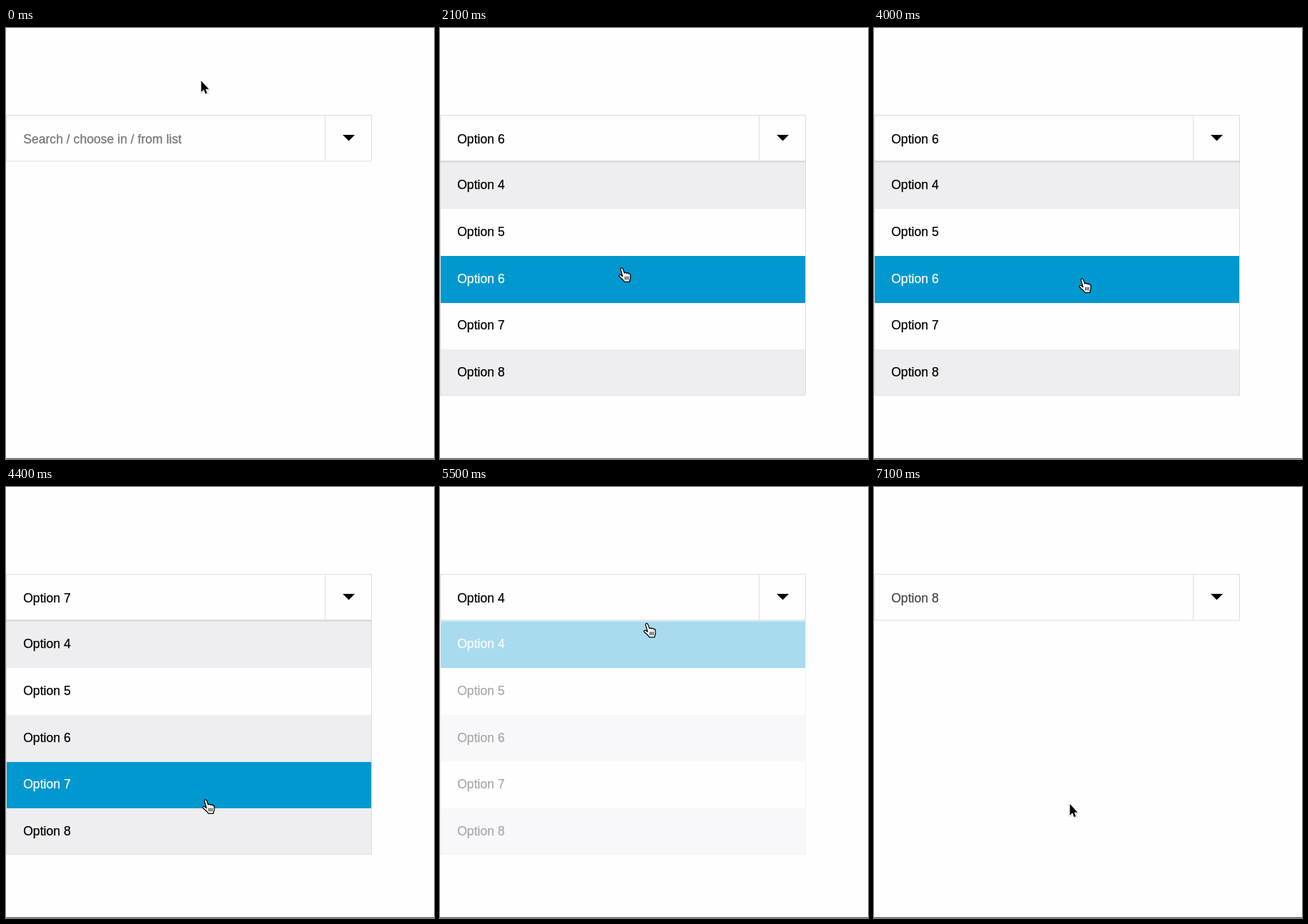
An HTML page for the animation above (8000 ms loop, 600 px wide and 605 px high).

```html
<!DOCTYPE html>
<html lang="en">
<head>
<meta charset="utf-8">
<title>Combo box</title>
<style>
html, body { margin: 0; width: 100%; height: 100%; overflow: hidden; background: #fefdff; }
svg { display: block; width: 600px; height: 605px; }
text {
  font: 17.6px "Liberation Sans", Arial, sans-serif;
  fill: currentColor; stroke: currentColor; stroke-width: .25px;
}
.line { fill: none; stroke: #dddcdf; }
</style>
</head>
<body>
<svg viewBox="0 0 600 605">
  <rect width="600" height="605" fill="#fefdff"/>
  <rect y="604" width="600" height="1" fill="#4b474e"/>
  <path class="line" d="M.5 122.5H512.5V187H.5ZM447.5 122.5V187"/>
  <path d="M472 150H489L480.5 158.5Z"/>
  <text id="value" x="24.2" y="162"></text>
  <g id="list">
    <g id="rows"></g>
    <path class="line" d="M.5 187V515.5H512.5V187"/>
    <rect y="186.5" width="513" height="2" fill="#d6d5d8"/>
  </g>
  <g id="arrow" stroke-linejoin="round">
    <path d="M1 2V18L5 15 7 20 10 19 8 14H12Z" opacity=".18" stroke="#000" stroke-width="2"/>
    <path d="M.6 1V17L4.2 13.6 6.5 19.2 9 18.2 6.7 12.7H11.4Z" stroke="#fff" stroke-width="2" paint-order="stroke"/>
  </g>
  <g id="hand" stroke="#000" stroke-width="1.3" stroke-linejoin="round" stroke-linecap="round">
    <path fill="#fff" d="M3.2 3C2.7.8 5.3 0 6.3 2L8.6 8C9.2 6.8 11 6.9 11.6 8.3 12.3 7.3 13.9 7.6 14.4 9 15.4 8.4 16.7 9 16.9 10.6L17 14.5C17 16.5 16 17.6 15.6 20.3H8.6C7.6 18 4.6 16 1.2 12.8 0 11.2 1.8 9.8 3.4 10.8L6 12.6Z"/>
    <path fill="none" stroke-width="1" d="M9.6 13V17M11.8 13V17M14 13V17"/>
  </g>
</svg>
<script>
const LOOP = 8000, STEP = 100;
const TOP = 188.4, ROW = 65.7, ROWS = 5, FIRST = 4;
const $ = id => document.getElementById(id);
const clamp = v => Math.max(0, Math.min(1, v));
const ease = u => u * u * (3 - 2 * u);

// Each glide: start, duration, end x, end y
const glides = [
  [0, 700, 64, 188],
  [1400, 700, 250, 336], [2100, 200, 266, 385], [2500, 800, 290, 165],
  [3500, 500, 287, 351], [4000, 400, 275, 438], [4600, 600, 291, 140],
  [5400, 400, 253, 464], [6300, 200, 274, 444]
];
// When the list opens and closes
const sessions = [[1000, 2500], [3600, 4600], [5500, 6200]];

function cursorAt(t) {
  let x = 273, y = 73;
  for (const [start, time, toX, toY] of glides) {
    const k = ease(clamp((t - start) / time));
    x += (toX - x) * k;
    y += (toY - y) * k;
  }
  return { x, y };
}

function optionAt(y) {
  const row = Math.floor((y - TOP) / ROW);
  return row >= 0 && row < ROWS ? FIRST + row : 0;
}

function listAt(t) {
  const state = { open: false, alpha: 0, chosen: 0, settled: 0 };
  for (const [from, to] of sessions) {
    if (t < from) break;
    state.open = t < to;
    const shown = (t + STEP - (state.open ? from : to)) / 300;
    state.alpha = clamp(state.open ? shown : 1 - shown);
    state.settled = clamp((t - to) / 800);
    if (!state.open) state.chosen = optionAt(cursorAt(to).y);
  }
  return state;
}

const rowEdge = i => Math.min(515, Math.round(TOP + i * ROW));
const rows = Array.from({ length: ROWS }, (_, i) => {
  const y = rowEdge(i);
  $('rows').insertAdjacentHTML('beforeend',
    `<g><rect x="1" y="${y}" width="511" height="${rowEdge(i + 1) - y}"/>` +
    `<text x="24.2" y="${Math.round(226.3 + i * ROW)}">Option ${FIRST + i}</text></g>`);
  return $('rows').lastChild.children;
});

function place(id, { x, y }, shown) {
  $(id).setAttribute('transform', `translate(${x} ${y})`);
  $(id).setAttribute('visibility', shown ? 'visible' : 'hidden');
}

function draw(t) {
  const cursor = cursorAt(t);
  const { open, alpha, chosen, settled } = listAt(t);
  const active = (open && optionAt(cursor.y)) || chosen;

  const shade = 72 * settled;
  $('value').textContent = active ? 'Option ' + active : 'Search / choose in / from list';
  $('value').style.color = active ? `rgb(${shade},${shade},${shade})` : '#757478';

  $('list').setAttribute('opacity', alpha);
  rows.forEach(([box, label], i) => {
    const on = FIRST + i === active;
    box.setAttribute('fill', on ? '#0098cf' : i % 2 ? '#fefdff' : '#eeedef');
    label.style.color = on ? '#fff' : '#000';
  });

  const pointing = cursor.y >= 122 && cursor.y <= (open ? 515 : 188);
  place('hand', cursor, pointing);
  place('arrow', cursor, !pointing);
}

const start = performance.now();
function tick() {
  const t = (performance.now() - start) % LOOP;
  draw(Math.floor(t / STEP) * STEP);
  requestAnimationFrame(tick);
}
tick();
</script>
</body>
</html>
```
